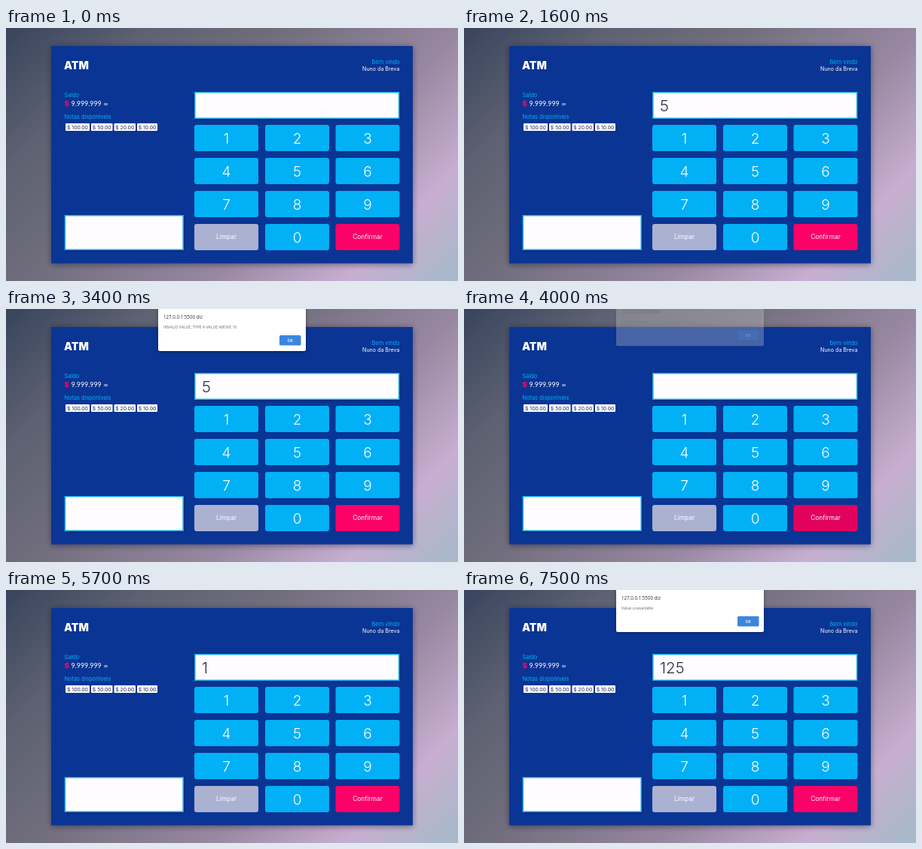
An HTML page with a canvas that plays this animation: 600x337 px, repeating every 8 s.

```html
<!DOCTYPE html>
<html lang="pt">
<head>
<meta charset="utf-8">
<title>ATM</title>
<style>
html, body { margin: 0; width: 100%; height: 100%; overflow: hidden; background: #6f6c7c; }
canvas { display: block; width: 600px; height: 337px; }
</style>
</head>
<body>
<canvas id="stage"></canvas>
<script>
const W = 600, H = 337, LOOP = 8000, STEP = 100;
const canvas = document.getElementById('stage');
const ctx = canvas.getContext('2d');
const dpr = window.devicePixelRatio || 1;
canvas.width = W * dpr;
canvas.height = H * dpr;

const SANS = 'Inter, "Open Sans", sans-serif';
const UI = '"Open Sans", "Noto Sans", sans-serif';
const CYAN = '#02b0f6', PINK = '#fb0268', NAVY = '#0a3594', WHITE = '#fffdff';

const COLS = [250, 344, 437.5], ROWS = [129, 173, 217, 261];
const KEYS = ['1', '2', '3', '4', '5', '6', '7', '8', '9', 'Limpar', '0', 'Confirmar'];

// Each press darkens its key, holds, then eases back.
const PRESSES = [
  { key: '5', at: 1400, hold: 100, ease: 100 },
  { key: 'Confirmar', at: 3900, hold: 200, ease: 0 },
  { key: '1', at: 5500, hold: 100, ease: 100 },
  { key: '2', at: 6100, hold: 200, ease: 100 },
  { key: '5', at: 6700, hold: 100, ease: 0 }
];
const INPUT = [[0, ''], [1400, '5'], [3900, ''], [5500, '1'], [6100, '12'], [6700, '125']];
const DIALOGS = [
  { from: 2300, to: 3900, fadeIn: 200, text: 'INVALID VALUE, TYPE A VALUE ABOVE 10' },
  { from: 7500, to: 9000, fadeIn: 0, text: 'Value unavailable' }
];

function box(x, y, w, h, fill, r = 0) {
  ctx.fillStyle = fill;
  ctx.beginPath();
  ctx.roundRect(x, y, w, h, r);
  ctx.fill();
}

function label(str, x, y, size, color, { weight = 400, align = 'left', font = SANS } = {}) {
  ctx.font = `${weight} ${size}px ${font}`;
  ctx.textAlign = align;
  ctx.fillStyle = color;
  ctx.fillText(str, x, y);
}

function withShadow(color, blur, y, draw) {
  ctx.save();
  ctx.shadowColor = color;
  ctx.shadowBlur = blur * dpr;
  ctx.shadowOffsetY = y * dpr;
  draw();
  ctx.restore();
}

function field(x, y, w, h) {
  withShadow('rgba(0,10,60,.35)', 4, 1, () => box(x, y, w, h, '#19aaea'));
  box(x + 1.6, y + 1.6, w - 3.2, h - 3.2, WHITE);
}

function backdrop() {
  // Runs along the 135 degree diagonal.
  const reach = (W + H) / 4;
  const g = ctx.createLinearGradient(W / 2 - reach, H / 2 - reach, W / 2 + reach, H / 2 + reach);
  [[0, '#38445d'], [0.2, '#5d6171'], [0.4, '#716e7d'], [0.65, '#9888a1'],
   [0.84, '#c8aed0'], [1, '#a4bac9']].forEach(([at, c]) => g.addColorStop(at, c));
  ctx.fillStyle = g;
  ctx.fillRect(0, 0, W, H);
}

function account() {
  label('ATM', 77, 55.2, 14, WHITE, { weight: 900 });
  label('Bem vindo', 522.5, 48, 7.4, CYAN, { align: 'right' });
  label('Nuno da Breva', 522.5, 57, 7.1, WHITE, { align: 'right' });
  label('Saldo', 77.5, 91.7, 7.4, CYAN);
  label('$', 77.5, 104.3, 9.5, PINK, { weight: 800 });
  label('9.999.999', 86.5, 104.3, 8.9, WHITE, { font: 'Lato, sans-serif' });
  label('∞', 129, 104.3, 8.2, WHITE, { font: '"DejaVu Sans", sans-serif' });
  label('Notas disponíveis', 77.5, 121.3, 7.4, CYAN);
  [['100', 79, 32], ['50', 113, 28.5], ['20', 143.5, 28.5], ['10', 174, 27]].forEach(([n, x, w]) => {
    box(x, 127, w, 10, WHITE, 1);
    label(`$ ${n}.00`, x + w / 2, 134.6, 6.8, '#1f2c58', { align: 'center' });
  });
}

function pressure(key, t) {
  let p = 0;
  for (const { key: k, at, hold, ease } of PRESSES) {
    const d = t - at;
    if (k !== key || d < 0) continue;
    if (d < hold) p = 1;
    else if (d < hold + ease) p = 0.5;
  }
  return p;
}

function keypad(t) {
  KEYS.forEach((key, i) => {
    const x = COLS[i % 3], y = ROWS[Math.floor(i / 3)];
    const fill = key === 'Limpar' ? '#abb1d1' : key === 'Confirmar' ? PINK : CYAN;
    box(x, y, 85, 35, fill, 3);
    const p = pressure(key, t);
    if (p) box(x, y, 85, 35, `rgba(0,0,0,${0.1 * p})`, 3);
    const word = key.length > 1;
    label(key, x + 42.5, y + (word ? 20.3 : 24.5), word ? 8.4 : 19, WHITE,
      { align: 'center', weight: word ? 400 : 350 });
  });
}

function dialogAlpha(d, t) {
  if (t < d.from) return 0;
  if (t < d.to) return d.fadeIn ? Math.min(1, (t - d.from + STEP) / d.fadeIn) : 1;
  return Math.max(0, 0.65 - (t - d.to) / 250);
}

function dialog(d, t) {
  const a = dialogAlpha(d, t);
  if (a <= 0) return;
  ctx.save();
  ctx.globalAlpha = a;
  ctx.translate(0, -9 * (1 - a));
  withShadow('rgba(0,0,0,.35)', 5, 1, () => box(202, -12, 196, 68, '#fff', 2));
  label('127.0.0.1:5500 diz', 209, 13.2, 6.2, '#2c3042', { font: UI });
  label(d.text, 209, 25.6, 5.2, '#62666f', { font: UI });
  box(363, 35, 28.5, 13.5, '#3c86de', 1.5);
  label('OK', 377.2, 43.8, 5.2, '#fff', { weight: 600, align: 'center', font: UI });
  ctx.restore();
}

function render(t) {
  ctx.setTransform(dpr, 0, 0, dpr, 0, 0);
  backdrop();
  withShadow('rgba(20,20,50,.5)', 8, 1, () => box(60, 24, 480, 289.5, NAVY));
  account();
  field(77.5, 249, 158.5, 47);
  field(250, 85, 272.5, 36);
  const typed = INPUT.filter(([at]) => t >= at).pop()[1];
  label(typed, 260, 110.7, 20.5, '#2b2c48', { weight: 300 });
  keypad(t);
  DIALOGS.forEach(d => dialog(d, t));
}

const start = performance.now();
function tick() {
  const t = (performance.now() - start) % LOOP;
  render(Math.floor(t / STEP) * STEP);
  requestAnimationFrame(tick);
}
tick();
</script>
</body>
</html>
```
